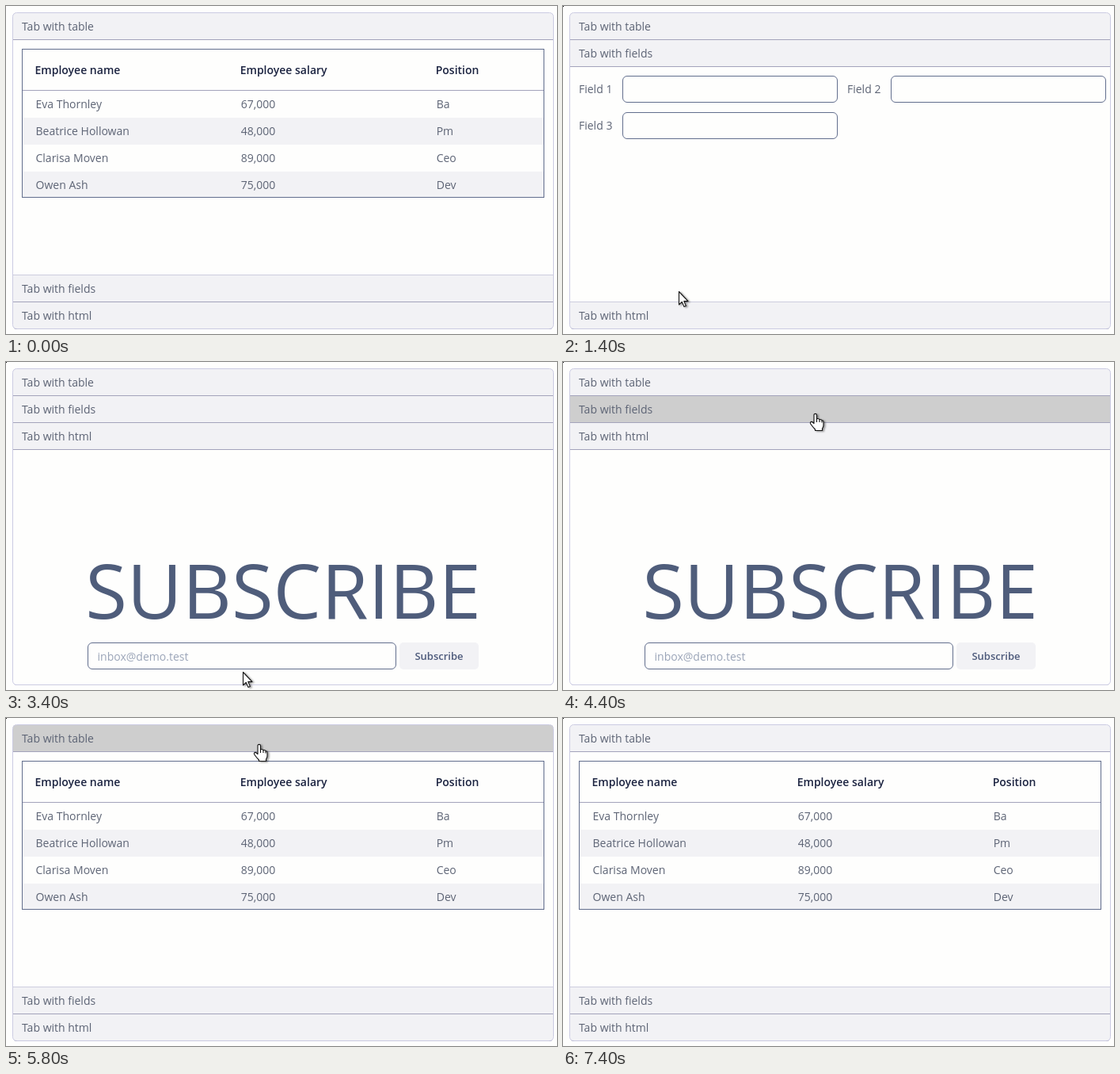
An HTML page for the animation above (7600 ms loop, 696x414 px).

```html
<!DOCTYPE html>
<html lang="en">
<head>
<meta charset="utf-8">
<title>Accordion</title>
<style>
  html, body { margin: 0; width: 100%; height: 100%; overflow: hidden; background: #fefefd; }
  svg { display: block; }
  text { font: 14px "Open Sans", sans-serif; fill: #5d6475; white-space: pre; }
  .th { font-weight: 600; fill: #1b2340; }
  .box { fill: none; stroke: #626e8d; }
  .bar { fill: #f2f2f5; }
  .bar.hover { fill: #cecece; }
  .rule { fill: #a3a3bb; }
  .edge { fill: #cdcdde; }
  .big { font-size: 96px; fill: #4f5d7b; text-anchor: middle; }
  .hint { fill: #9ba5b8; }
  .btn { font-size: 13px; font-weight: 600; fill: #4c597a; text-anchor: middle; }
  #cursor { filter: drop-shadow(2px 1px 1px rgba(0, 0, 0, .4)); }
  #cursor path { fill: #fff; stroke: #111; stroke-width: 1.1; stroke-linejoin: round; }
</style>
</head>
<body>
<svg id="stage" width="696" height="414" viewBox="0 0 696 414">
  <clipPath id="round"><rect x="8" y="8" width="684" height="400" rx="5.5"/></clipPath>
  <g id="panel" clip-path="url(#round)"></g>
  <rect x="8.5" y="8.5" width="683" height="399" rx="5" fill="none" stroke="#cbcbe2"/>
  <rect id="dot" width="1" height="1"/>
  <g id="cursor">
    <path id="arrow" d="M.5 .5V17L4.3 13.5 7 19.6 9.4 18.6 6.8 12.6H12Z"/>
    <g id="hand">
      <path d="M-1 1.8Q-1 .4 .8 .4Q2.5 .4 2.5 2V6.6Q5.5 6 6 7.6Q8.5 7 9 8.8Q11 8.6 11 10.8V15Q11 17 9.5 19V21.5H.5V20Q-2 17.5 -5.5 12.7Q-6 10.4 -4 10.4Q-2.5 10.7 -1 12.6Z"/>
      <path d="M2.5 6.6V11M6 7.6V11M9 8.8V11.5"/>
    </g>
  </g>
</svg>
<script>
const LOOP = 7600, STEP = 200, BAR = 34, BODY = 297, TOP = 9;
const $ = id => document.getElementById(id);

const text = (x, y, s, cls = "") => `<text x="${x}" y="${y}" class="${cls}">${s}</text>`;
const rect = (x, y, w, h, cls, rx = 0) =>
  `<rect x="${x}" y="${y}" width="${w}" height="${h}" rx="${rx}" class="${cls}"/>`;
const input = (x, y, w) => rect(x + .5, y + .5, w - 1, 33, "box", 5.5);

function tableBody() {
  const cols = [36.5, 295.7, 542.7];
  const rows = [
    ["Eva Thornley", "67,000", "Ba"],
    ["Beatrice Hollowan", "48,000", "Pm"],
    ["Clarisa Moven", "89,000", "Ceo"],
    ["Owen Ash", "75,000", "Dev"]
  ];
  const heads = ["Employee name", "Employee salary", "Position"];
  return rect(21, 141, 658, 34, "bar") + rect(21, 209, 658, 32, "bar") +
    rect(21, 106, 658, 1, "rule") + rect(20.5, 54.5, 659, 187, "box") +
    heads.map((s, c) => text(cols[c], 86, s, "th")).join("") +
    rows.map((row, r) => row.map((s, c) => text(cols[c] + 1, 129 + r * 34, s)).join("")).join("");
}

function fieldsBody() {
  return [[20, 88], [359, 88], [20, 134]].map(([x, y], i) =>
    text(x, y + 22, `Field ${i + 1}`) + input(x + 55, y, 272)).join("");
}

function htmlBody() {
  return text(350, 324, "SUBSCRIBE", "big") +
    input(103, 354, 390) + text(115.5, 377, "inbox@demo.test", "hint") +
    rect(497, 354, 100, 34, "bar", 5) + text(547, 376, "Subscribe", "btn");
}

const tabs = [
  ["Tab with table", tableBody()],
  ["Tab with fields", fieldsBody()],
  ["Tab with html", htmlBody()]
].map(([title, body], i) => {
  const y0 = TOP + BAR * (i + 1);
  $("panel").insertAdjacentHTML("beforeend", `<g>
    ${rect(9, 0, 682, BAR, "bar")}${rect(9, BAR - 1, 682, 1, "rule")}${text(20, 22, title)}
    <svg y="${BAR}" width="696" overflow="hidden"><g transform="translate(0 ${-y0})">${body}</g></svg>
    ${rect(9, 0, 682, 1, "edge")}</g>`);
  const g = $("panel").lastElementChild;
  return { g, bar: g.querySelector(".bar"), body: g.querySelector("svg"), edge: g.lastElementChild };
});

// [start, closing tab, opening tab]
const switches = [[1000, 0, 1], [3000, 1, 2], [5000, 2, 0]];
const SLIDE = 400;

// [time, x, y] of the pointer tip
const path = [
  [400, 92, 338], [800, 146, 360], [1400, 146, 360], [2600, 301, 391],
  [2800, 301, 391], [3400, 299, 391], [4200, 316, 88], [4600, 320, 41],
  [5000, 320, 41], [5400, 319, 33], [6600, 319, 33], [6800, 319, 16]
];

const ease = p => p * p * (3 - 2 * p);

function heights(t) {
  const h = [BODY, 0, 0];
  for (const [start, from, to] of switches) {
    if (t < start) break;
    h[to] = Math.round(BODY * ease(Math.min(1, (t - start) / SLIDE)));
    h[from] = BODY - h[to];
  }
  return h;
}

function pointer(t) {
  const i = path.findIndex(k => k[0] >= t);
  if (i < 0 || t < path[0][0]) return null;
  if (i === 0) return path[0].slice(1);
  const [a, b] = [path[i - 1], path[i]];
  const p = ease((t - a[0]) / (b[0] - a[0]));
  return [1, 2].map(n => Math.round(a[n] + (b[n] - a[n]) * p));
}

function draw(t) {
  const tip = pointer(t);
  let y = TOP, over = false;
  heights(t).forEach((h, i) => {
    const { g, bar, body, edge } = tabs[i];
    const hover = !!tip && tip[1] >= y && tip[1] < y + BAR;
    over = over || hover;
    g.setAttribute("transform", `translate(0 ${y})`);
    bar.classList.toggle("hover", hover);
    body.setAttribute("height", h);
    body.style.display = edge.style.display = h ? "" : "none";
    edge.setAttribute("y", BAR + h - 1);
    y += BAR + h;
  });
  $("dot").style.display = t < 400 ? "none" : "";
  $("cursor").style.display = tip ? "" : "none";
  if (!tip) return;
  $("cursor").setAttribute("transform", `translate(${tip})`);
  $("hand").style.display = over ? "" : "none";
  $("arrow").style.display = over ? "none" : "";
}

const begin = performance.now();
function tick() {
  const t = (performance.now() - begin) % LOOP;
  draw(Math.floor(t / STEP) * STEP);
  requestAnimationFrame(tick);
}
tick();
</script>
</body>
</html>
```
